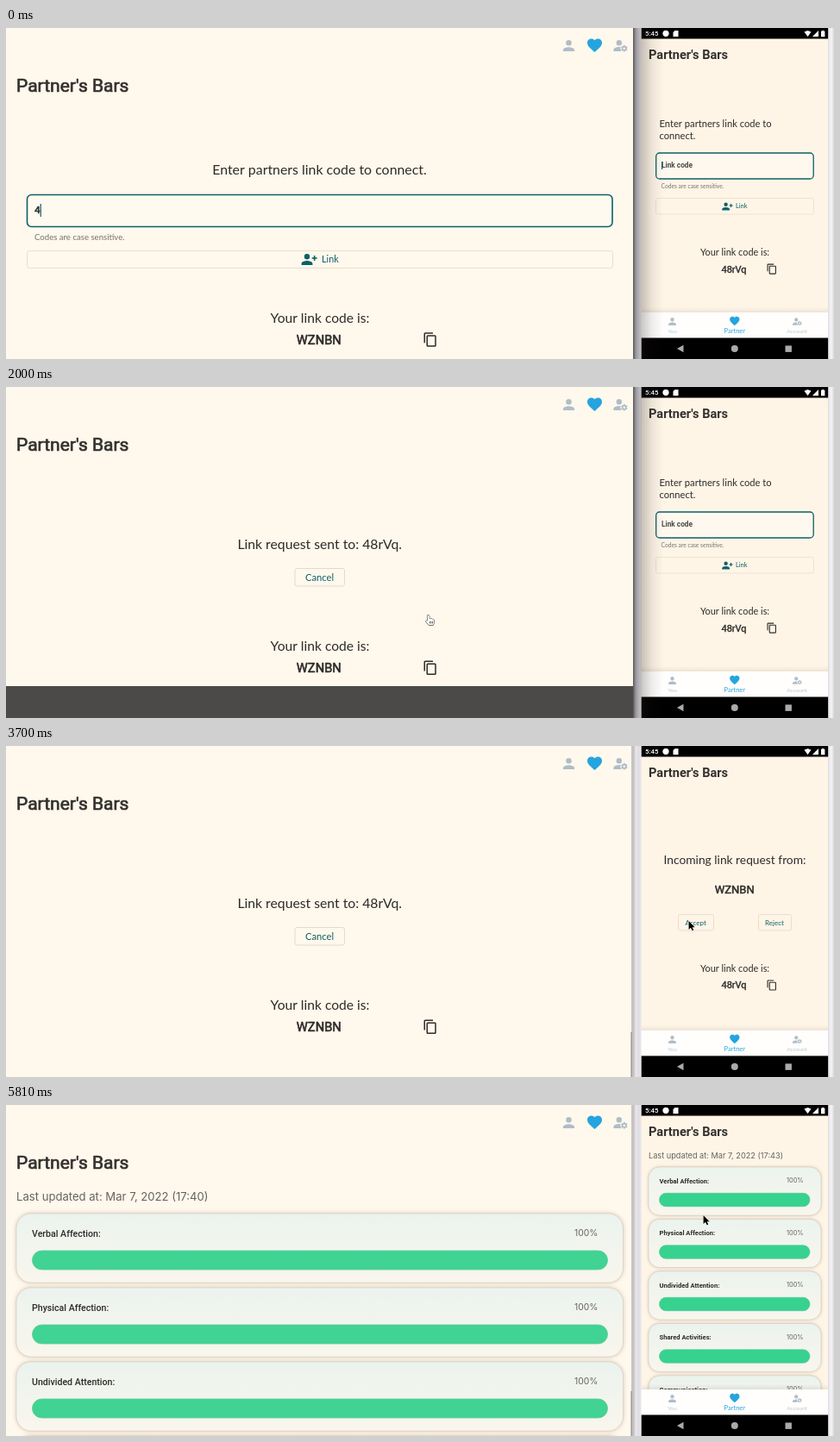
Animation, 960 px wide and 384 px high, one loop 5930 ms. Source, as an HTML page with a canvas:

```html
<!DOCTYPE html>
<html lang="en">
<head>
<meta charset="utf-8">
<title>Partner link</title>
<style>
html, body { margin: 0; width: 100%; height: 100%; overflow: hidden; background: #fff8ec; }
canvas { display: block; width: 960px; height: 384px; }
</style>
</head>
<body>
<canvas id="stage" width="960" height="384"></canvas>
<script>
const ctx = document.getElementById('stage').getContext('2d');
const LOOP = 5930, STEP = 100;
const INK = '#2d2b29', TEAL = '#0d6068', RED = '#bb3030', GREY = '#76736e', SOFT = '#66635f';
const PALE = '#afbdc9', BLUE = '#25a4df', CREAM = '#fff8ec', PHONE = '#fef5e7', WHITE = '#fffefd';
const LATO = 'Lato, sans-serif', ROBOTO = 'Roboto, sans-serif', INTER = 'Inter, sans-serif';
const BARS = ['Verbal Affection', 'Physical Affection', 'Undivided Attention', 'Shared Activities', 'Communication'];
const TITLE = "Partner's Bars", CODE = '48rVq', OTHER = 'WZNBN';
const ICON = {
  person: new Path2D('M12 12a4 4 0 1 0 0-8 4 4 0 0 0 0 8zm0 2c-2.67 0-8 1.34-8 4v2h16v-2c0-2.66-5.33-4-8-4z'),
  heart: new Path2D('M12 21.3l-1.4-1.3C5.4 15.4 2 12.3 2 8.5 2 5.4 4.4 3 7.5 3c1.7 0 3.4.8 4.5 2.1C13.1 3.8 14.8 3 16.5 3 19.6 3 22 5.4 22 8.5c0 3.8-3.4 6.9-8.6 11.5z'),
  copy: new Path2D('M16 1H4a2 2 0 0 0-2 2v14h2V3h12zm3 4H8a2 2 0 0 0-2 2v14a2 2 0 0 0 2 2h11a2 2 0 0 0 2-2V7a2 2 0 0 0-2-2zm0 16H8V7h11z'),
  arrow: new Path2D('M0 0V11.5L2.7 9 4.7 13.2 6.6 12.3 4.7 8.3H8.2z'),
  hand: new Path2D('M3 .5Q4.5 0 5 2V5Q6.5 4 7 5.3 8.5 4.6 9 6 10.6 5.5 10.8 7.5V10L9.5 13H4.2L.6 8.5Q.5 7 2.6 7.8V2Q2.5 1 3 .5z')
};

// time since the press, share of the full height
const SNACK = [[-100, 0], [0, 0.32], [100, 1], [200, 1], [300, 0.5], [400, 0.08], [500, 0]];
// time, x, y of the pointer tip
const POINTER = [[3000, 515, 258], [3100, 630, 211], [3200, 725, 185], [3300, 766, 180], [3400, 783, 188],
  [3500, 789, 197], [3700, 792, 203], [4000, 792, 203], [4200, 793, 205], [5400, 793, 205],
  [5500, 790, 198], [5600, 793, 170], [5700, 804, 140], [5800, 809, 128]];

// linear path through [time, ...values] points
function along(points, t) {
  if (t <= points[0][0]) return points[0].slice(1);
  const i = points.findIndex(p => p[0] >= t);
  if (i < 0) return points.at(-1).slice(1);
  const [t0, ...from] = points[i - 1], [t1, ...to] = points[i];
  return from.map((v, k) => v + (to[k] - v) * (t - t0) / (t1 - t0));
}

function rect(x, y, w, h, color) {
  ctx.fillStyle = color;
  ctx.fillRect(x, y, w, h);
}

function box(x, y, w, h, r, fill, stroke, line = 1) {
  ctx.beginPath();
  ctx.roundRect(x, y, w, h, r);
  if (fill) { ctx.fillStyle = fill; ctx.fill(); }
  if (stroke) { ctx.strokeStyle = stroke; ctx.lineWidth = line; ctx.stroke(); }
}

function disc(x, y, r, color) {
  ctx.beginPath();
  ctx.arc(x, y, r, 0, 7);
  ctx.fillStyle = color;
  ctx.fill();
}

function shape(color, pts) {
  ctx.beginPath();
  for (let i = 0; i < pts.length; i += 2) ctx.lineTo(pts[i], pts[i + 1]);
  ctx.fillStyle = color;
  ctx.fill();
}

// colours are spread evenly from (x0, y0) to (x1, y1)
function blend(x0, y0, x1, y1, ...colors) {
  const g = ctx.createLinearGradient(x0, y0, x1, y1);
  colors.forEach((c, i) => g.addColorStop(i / (colors.length - 1), c));
  return g;
}

// y is the middle of the capital letters; embolden thickens the regular weight
function text(str, x, y, size, { font = LATO, color = INK, weight = 400, align = 'left', embolden = 0 } = {}) {
  ctx.font = `${weight} ${size}px ${font}`;
  ctx.textAlign = align;
  ctx.fillStyle = color;
  const base = y + size * 0.335;
  ctx.fillText(str, x, base);
  if (embolden) {
    ctx.lineWidth = embolden;
    ctx.lineJoin = 'round';
    ctx.strokeStyle = color;
    ctx.strokeText(str, x, base);
  }
  return ctx.measureText(str).width;
}

const centered = (str, x, y, size, opts) => text(str, x, y, size, { ...opts, align: 'center' });

function icon(name, x, y, scale, color) {
  ctx.save();
  ctx.translate(x - 12 * scale, y - 12 * scale);
  ctx.scale(scale, scale);
  ctx.fillStyle = color;
  ctx.fill(ICON[name], 'evenodd');
  ctx.restore();
}

function accountIcon(x, y, s, bg) {
  icon('person', x - 1.5 * s, y, s, PALE);
  const gx = x + 6 * s, gy = y + 4 * s;
  disc(gx, gy, 5.6 * s, bg);
  ctx.save();
  ctx.translate(gx, gy);
  for (let i = 0; i < 6; i++) {
    rect(-1.2 * s, -4.7 * s, 2.4 * s, 3 * s, PALE);
    ctx.rotate(Math.PI / 3);
  }
  ctx.restore();
  disc(gx, gy, 3.6 * s, PALE);
  disc(gx, gy, 1.6 * s, bg);
}

function linkIcon(x, y, s) {
  icon('person', x - 2.5 * s, y, s, TEAL);
  rect(x + 4.6 * s, y - 2.9 * s, 7.4 * s, 2 * s, TEAL);
  rect(x + 7.3 * s, y - 5.6 * s, 2 * s, 7.4 * s, TEAL);
}

function card(x, y, w, h, k) {
  ctx.save();
  ctx.shadowColor = 'rgba(120,80,50,.35)';
  ctx.shadowBlur = 5 * k;
  box(x, y, w, h, 17 * k, blend(0, y, 0, y + h, '#ebf3ee', '#f9f6ed'));
  ctx.restore();
  box(x, y, w, h, 17 * k, null, 'rgba(190,180,165,.4)', 0.8);
}

function desktopCard(name, i) {
  const y = 126 + i * 86;
  card(12, y, 703.5, 80, 1);
  text(name + ':', 30, y + 23, 10.6, { font: ROBOTO, weight: 500 });
  text('100%', 659, y + 22.5, 10.3, { font: INTER, color: SOFT });
  box(30.5, y + 43, 667, 22, 11, '#41d393', '#58cd9b', 0.8);
}

function phoneCard(name, i) {
  const y = 72 + i * 60.5;
  card(745, y, 200, 56, 0.75);
  text(name + ':', 757.5, y + 16, 7.6, { font: ROBOTO, weight: 700 });
  text('100%', 905, y + 16, 7.4, { font: INTER, color: SOFT });
  box(757.5, y + 30.3, 174.5, 15.4, 7.7, '#37d28f', '#4bcb94', 0.7);
}

function desktopCode(y) {
  centered('Your link code is:', 364, y, 15.6);
  centered(OTHER, 362.8, y + 24.8, 14.7, { font: ROBOTO, embolden: 0.6 });
  icon('copy', 492, y + 24.5, 0.75, INK);
}

function phoneCode(y) {
  centered('Your link code is:', 845, y, 10.9);
  centered(CODE, 844, y + 19.6, 11, { font: ROBOTO, embolden: 0.4 });
  icon('copy', 888, y + 19.3, 0.55, INK);
}

function drawForm(t) {
  const error = t >= 800 && t < 1700;
  centered('Enter partners link code to connect.', 363.5, 165, 15.9);
  box(24.5, 193.5, 678.5, 37, 5, '#fffaf0', error ? RED : TEAL, 1.6);
  const count = [0, 200, 600, 1000, 1500].filter(at => t >= at).length;
  const w = text(CODE.slice(0, count), 33, 211.5, 11.8, { font: ROBOTO, embolden: 0.5 });
  const caret = t < 1200 || (t >= 1500 && t < 1800);
  if (caret) rect(33 + w, 204, 1.2, 15, TEAL);
  text(error ? 'Code too short. Should be 5 characters.' : 'Codes are case sensitive.', 33, 243, 9.6,
    { color: error ? RED : GREY });
  box(24.5, 258.5, 679, 20, 3, null, '#e6ded1');
  linkIcon(351, 268.5, 0.8);
  text('Link', 366, 268.5, 10.8, { color: TEAL });
  desktopCode(337);
}

function drawRequest() {
  centered('Link request sent to: 48rVq.', 363.7, 183, 15.75);
  box(335, 210.5, 57.5, 20.5, 2.5, null, '#e2dacd');
  centered('Cancel', 363.5, 221, 11.2, { color: TEAL });
  desktopCode(301.2);
}

function drawDesktop(t) {
  rect(0, 0, 728, 384, CREAM);
  icon('person', 652.5, 20.5, 0.82, PALE);
  icon('heart', 682.5, 20.2, 0.85, BLUE);
  accountIcon(712, 20.5, 0.8, CREAM);
  text(TITLE, 12, 67.3, 21, { font: ROBOTO, embolden: 0.7, color: '#33302e' });
  if (t < 1900) drawForm(t);
  else if (t < 4800) drawRequest();
  else {
    text('Last updated at: Mar 7, 2022 (17:40)', 12, 106.5, 13.1, { font: INTER, color: SOFT });
    BARS.slice(0, 4).forEach(desktopCard);
  }
  const rise = along(SNACK, t - 1900)[0] * 37;
  rect(0, 384 - rise, 728, rise, '#4b4a48');
}

// the desktop window casts its shadow on the phone until it loses focus
function drawDivider(t) {
  if (t < 3600) {
    rect(736, 0, 26, 384, blend(736, 0, 762, 0, 'rgba(40,30,30,.26)', 'rgba(40,30,30,.08)', 'rgba(40,30,30,0)'));
    rect(727, 0, 9.5, 384, blend(727, 0, 736.5, 0, '#57555a', '#99969c', '#b2afb5', '#c3c0c5'));
  } else {
    rect(727, 0, 9.5, 384, blend(727, 0, 736.5, 0, '#b8b4b8', '#e9e7eb', '#dfdde2', '#e9e7ec'));
    rect(725, 0, 2.5, 384, '#c9c4c2');
    rect(724.5, 332, 1.2, 52, '#8d8988');
  }
  rect(953.5, 0, 6.5, 384, '#f1eff3');
  rect(953.5, 0, 0.8, 384, '#d5d2d6');
  rect(958.5, 0, 1.5, 384, '#dedce0');
}

function spinner(x, y, t) {
  const p = Math.min(1, (t - 4500) / 300);
  if (p <= 0) return disc(x, y, 1.2, TEAL);
  const turn = (t - 5000) / 1000 * Math.PI * 2;
  ctx.beginPath();
  ctx.arc(x, y, 9.4 * p, 0.65 + turn, 5.4 + turn);
  ctx.strokeStyle = TEAL;
  ctx.lineWidth = 2;
  ctx.stroke();
}

function drawPhoneForm(t) {
  text('Enter partners link code to', 757.5, 111.5, 11.2);
  text('connect.', 757.5, 125.5, 11.2);
  box(753.7, 145, 182.5, 30, 4, '#fff8ee', TEAL, 1.3);
  text('Link code', 760, 159.5, 8.3, { font: ROBOTO, weight: 700, color: '#4b4947' });
  const caret = t < 700 || (t >= 1300 && t < 1800) || t >= 2400;
  if (caret) rect(760, 155, 1.2, 9, TEAL);
  text('Codes are case sensitive.', 759.5, 183.8, 6.7, { color: GREY });
  box(753.5, 197.5, 183, 18.5, 2, null, '#eee2d3');
  linkIcon(836, 207, 0.55);
  text('Link', 846, 207, 7.4, { color: TEAL });
  phoneCode(260.3);
}

function drawIncoming() {
  centered('Incoming link request from:', 845, 132, 13.8);
  centered(OTHER, 844.7, 167, 13, { font: ROBOTO, embolden: 0.5 });
  box(779.5, 195.5, 41, 18.5, 2, null, '#eadfcf');
  box(872.5, 195.5, 38, 18.5, 2, null, '#eadfcf');
  centered('Accept', 799.7, 205, 8, { color: TEAL });
  centered('Reject', 891, 205, 8, { color: TEAL });
  phoneCode(258.2);
}

function drawPhoneBody(t) {
  if (t < 2700) drawPhoneForm(t);
  else if (t < 4500) drawIncoming();
  else if (t < 4700) {
    spinner(844.7, 144, t);
    phoneCode(203.7);
  } else if (t < 5200) spinner(844.7, 190, t);
  else {
    text('Last updated at: Mar 7, 2022 (17:43)', 745, 58.5, 9.2, { font: INTER, color: SOFT });
    BARS.forEach(phoneCard);
  }
  text(TITLE, 745, 31, 14.6, { font: ROBOTO, weight: 700, color: '#33302e' });
  rect(736.5, 324, 217, 6, blend(0, 324, 0, 330, 'rgba(90,70,50,0)', 'rgba(90,70,50,.1)'));
  const rise = along(SNACK, t - 4500)[0] * 33;
  rect(736.5, 330 - rise, 217, rise, '#4b4a48');
}

function drawPhoneBars() {
  rect(736.5, 330, 217, 30, WHITE);
  icon('person', 772.5, 340.5, 0.55, PALE);
  icon('heart', 844.8, 340, 0.57, BLUE);
  accountIcon(917, 340.5, 0.53, WHITE);
  centered('You', 772.5, 352, 6.5, { color: '#bcc7d0' });
  centered('Partner', 844.8, 351.5, 7.5, { color: BLUE });
  centered('Account', 917, 352, 6.5, { color: '#bcc7d0' });

  rect(736.5, 0, 217, 12.5, '#000');
  text('5:45', 741, 6.5, 7.8, { font: ROBOTO, weight: 500, color: '#fff' });
  disc(765, 6.3, 3.6, '#fff');
  shape('#fff', [773.5, 5, 775.5, 3, 779.5, 3, 779.5, 10, 773.5, 10]);
  shape('#fff', [925.5, 4.5, 929.5, 3, 933.5, 4.5, 929.5, 10]);
  shape('#fff', [935, 10, 942, 10, 942, 3]);
  rect(945, 3.6, 4.4, 6.6, '#fff');
  rect(946.2, 2.8, 2, 1, '#fff');

  rect(736.5, 359.5, 217, 24.5, '#000');
  shape('#aaa', [778, 372, 785.5, 367.7, 785.5, 376.3]);
  disc(844.8, 372, 4, '#aaa');
  rect(903.5, 368.5, 7.4, 7.4, '#aaa');
}

function drawPhone(t) {
  rect(736.5, 0, 217, 384, PHONE);
  ctx.save();
  ctx.beginPath();
  ctx.rect(736, 12, 218, 318);
  ctx.clip();
  drawPhoneBody(t);
  ctx.restore();
  drawPhoneBars();
}

function drawPointer(t) {
  if (t < 1700) return;
  const hand = t < 3000;
  const [x, y] = hand ? [486.5, 264] : along(POINTER, t);
  const path = hand ? ICON.hand : ICON.arrow;
  const scale = hand ? 0.95 : 0.86;
  ctx.save();
  ctx.translate(x - 0.4, y);
  ctx.scale(scale, scale);
  ctx.lineJoin = 'round';
  ctx.lineWidth = 1;
  ctx.strokeStyle = hand ? '#111' : '#fff';
  ctx.fillStyle = hand ? '#fff' : '#000';
  ctx.stroke(path);
  ctx.fill(path);
  if (hand) for (const fx of [5, 6.8, 8.6]) rect(fx, 8.2, 0.8, 2.8, '#333');
  ctx.restore();
}

function frame(now) {
  const t = Math.min(5800, Math.floor((now % LOOP) / STEP) * STEP);
  drawDesktop(t);
  drawPhone(t);
  drawDivider(t);
  drawPointer(t);
  requestAnimationFrame(frame);
}
requestAnimationFrame(frame);
</script>
</body>
</html>
```
